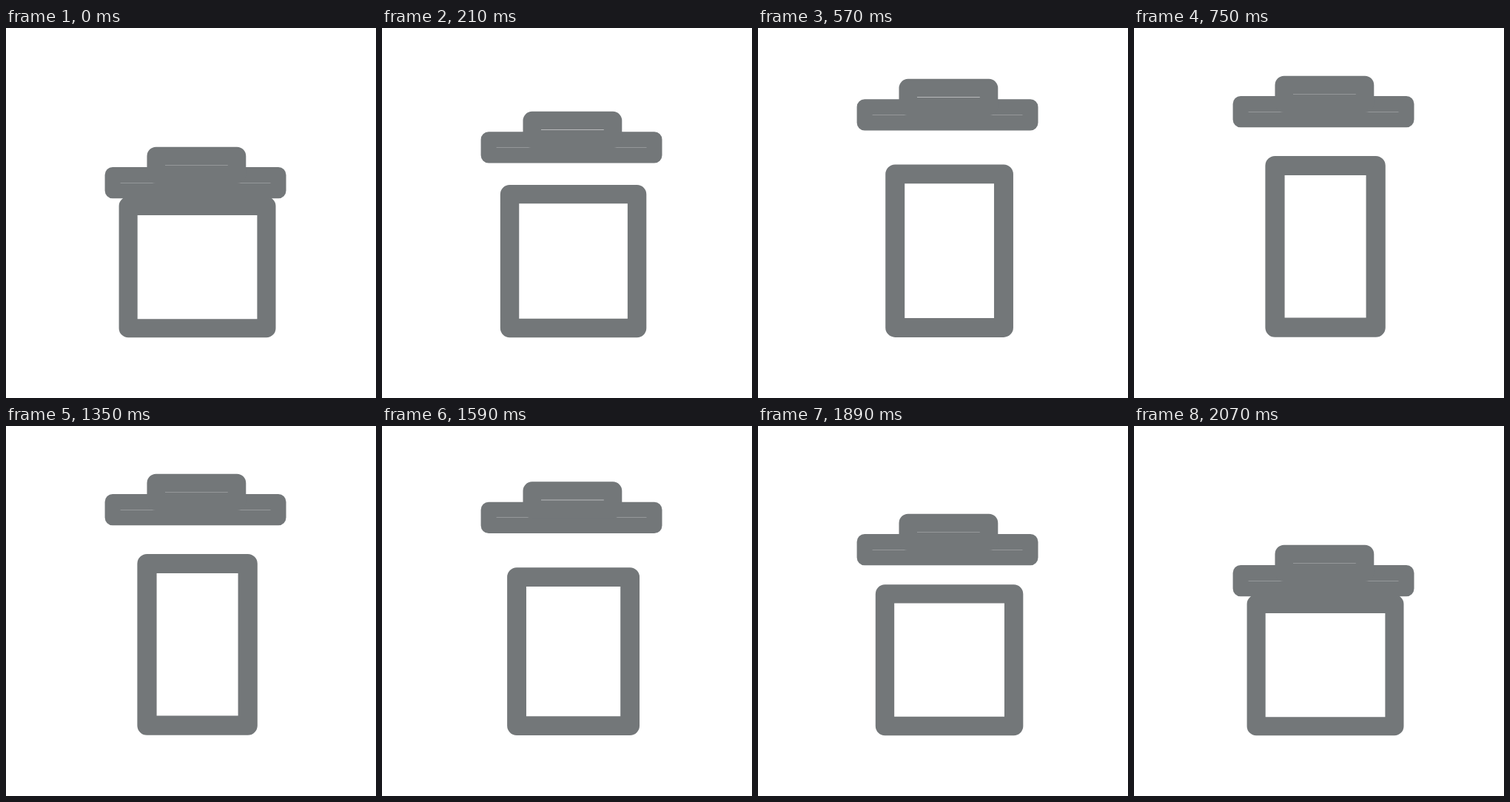
Animation, 500 px wide and 500 px high, one loop 2.4 s. Source, as an HTML page:

```html
<!DOCTYPE html>
<html lang="en">
<head>
<meta charset="utf-8">
<title>Bin</title>
<style>
  html, body { margin: 0; width: 100%; height: 100%; overflow: hidden; background: #fff; }
  svg { display: block; width: 100%; height: 100%; }
  rect { fill: none; stroke: #737779; stroke-linejoin: round; }
</style>
</head>
<body>
<svg viewBox="0 0 500 500">
  <rect id="body"/>
  <g id="lid">
    <rect id="brim"/>
    <rect id="knob"/>
  </g>
</svg>
<script>
const LOOP = 2400, STEP = 30, MOVE = 720, CLOSE_AT = 1350, LIFT = 96;
const [body, lid, brim, knob] = ['body', 'lid', 'brim', 'knob'].map(id => document.getElementById(id));

const mix = (a, b, u) => a + (b - a) * u;
const clamp = u => Math.min(1, Math.max(0, u));

// Places a stroked rectangle by its outer edges.
function frame(el, left, top, right, bottom, line) {
  const attrs = {
    x: left + line / 2, y: top + line / 2,
    width: right - left - line, height: bottom - top - line,
    'stroke-width': line
  };
  for (const name in attrs) el.setAttribute(name, attrs[name]);
}

frame(brim, 133.6, 188, 378.5, 230.3, 21);
frame(knob, 190.5, 160.7, 324.3, 210, 24.5);

// The body stretches linearly; the lid decelerates up and accelerates down.
function draw(time) {
  const t = Math.floor(time % LOOP / STEP) * STEP;
  const open = t < CLOSE_AT ? clamp(t / MOVE) : 1 - clamp((t - CLOSE_AT) / MOVE);
  const rise = 1 - (1 - open) ** 2;
  lid.setAttribute('transform', `translate(0 ${-LIFT * rise})`);
  frame(body, mix(152.6, 177.4, open), mix(228, 172.9, open),
    mix(364.5, 339.8, open), mix(418.3, 417.8, open), mix(25.1, 26.2, open));
}

const start = performance.now();
function tick() {
  draw(performance.now() - start);
  requestAnimationFrame(tick);
}
tick();
</script>
</body>
</html>
```
